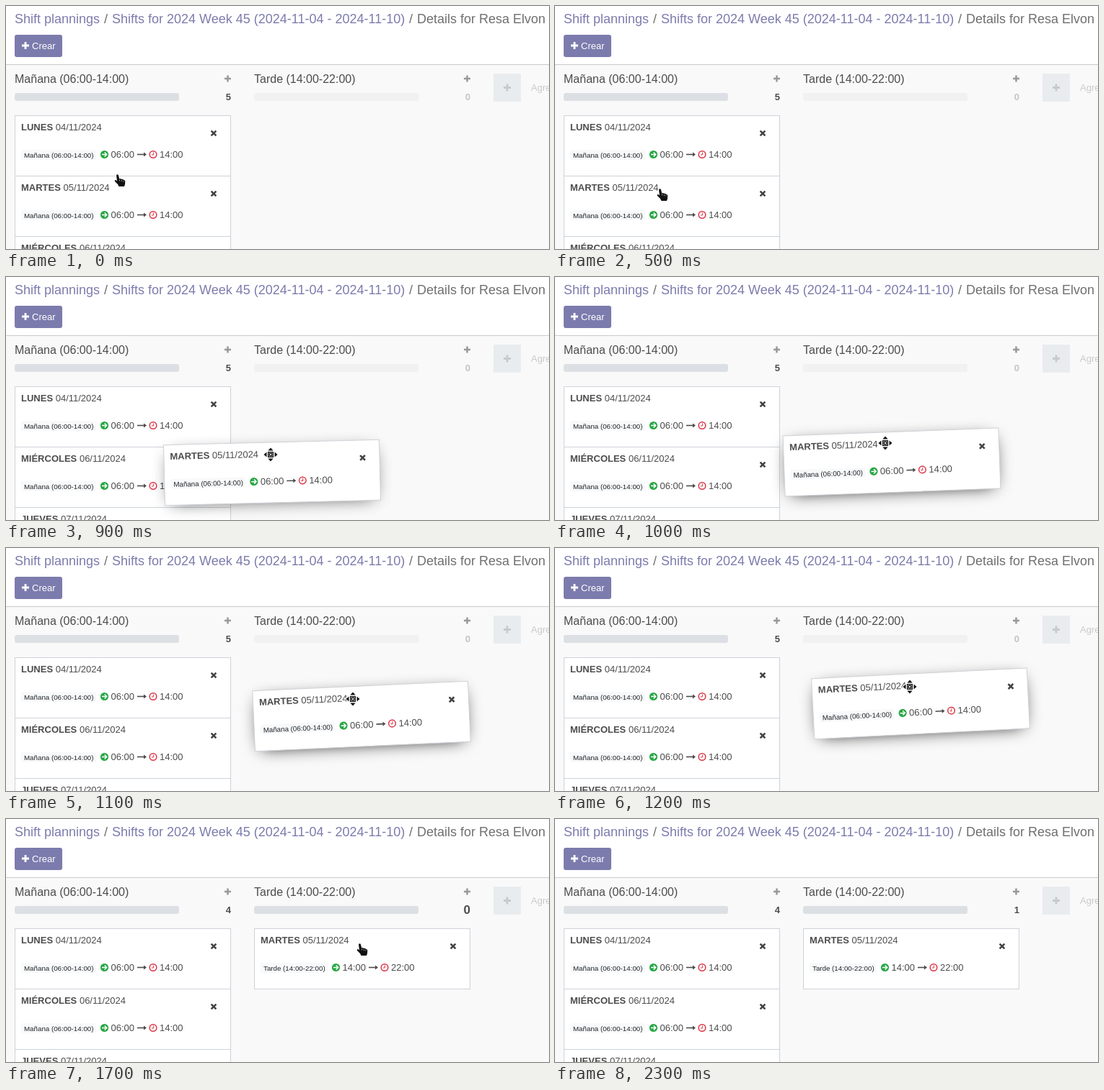
Write an HTML page that moves like this. It is 753 px wide and 338 px high and loops after 2.5 s.

```html
<!DOCTYPE html>
<html lang="es">
<head>
<meta charset="utf-8">
<title>Shift plannings</title>
<style>
html, body { margin: 0; width: 100%; height: 100%; overflow: hidden; background: #fff; }
svg { display: block; font: 13px "Liberation Sans", Arial, sans-serif; fill: #4c4c4c; }
text { white-space: pre; }
.bold { font-weight: bold; }
.nav { font-size: 18px; fill: #6f6f6f; }
.link { fill: #7c7bad; }
.head { font-size: 16px; }
.tag { font-size: 9.75px; fill: #212529; }
.shadow { filter: blur(12.5px); }
.cursor { fill: #111; stroke: #fff; stroke-width: 2; paint-order: stroke; stroke-linejoin: round; }
</style>
</head>
<body>
<svg id="stage" width="753" height="338" viewBox="0 0 753 338"></svg>
<script>
const LOOP = 2500, STEP = 100;
const stage = document.getElementById('stage');
const MORNING = { tag: 'Mañana (06:00-14:00)', from: '06:00', to: '14:00', shift: 0 };
const EVENING = { tag: 'Tarde (14:00-22:00)', from: '14:00', to: '22:00', shift: -11 };

// time, shape, x, y
const cursorTrack = [
  [0, 'hand', 154, 234], [300, 'hand', 151, 241], [400, 'hand', 147, 250], [500, 'hand', 145, 254],
  [800, 'move', 227, 259], [900, 'move', 367, 247], [1000, 'move', 458, 231],
  [1100, 'move', 481, 210], [1200, 'move', 492, 193], [1300, 'move', 491, 191],
  [1400, 'hand', 491, 190], [1500, 'hand', 491, 187], [1600, 'hand', 490, 181], [1700, 'hand', 490, 173],
  [1800, 'arrow', 443, 120], [1900, 'arrow', 389, 66], [2000, '', 0, 0]
];
// time, centre x, centre y, angle, shadow opacity
const dragTrack = [
  [800, 216, 281, -.55, .35], [900, 369, 272, -1.4, .75], [1000, 467, 257.5, -2.1, 1],
  [1100, 493, 234, -2.6, 1], [1200, 507, 216.3, -2.85, 1], [1300, 507, 215, -2.97, 1]
];
const at = (track, t) => track.findLast(k => k[0] <= t);

const cursors = {
  hand: `<path d="M-1 1.5Q.5-1 2 1.5L3.2 6.4Q5 5.4 6 7Q8 6 9 8Q11 7.5 11.3 10L11 14L10 17H2.5L1 14L-3 10Q-3.8 7.5-1.5 8.2L0 9.5Z"/>
    <path d="M3.6 7.5v2M6.4 8.2v2M9 9v1.5" stroke-width=".6"/>`,
  move: [0, 90, 180, 270].map(a => `<path transform="rotate(${a})" d="M0-9.5L3.6-5.5H-3.6Z"/>`).join('') +
    '<path d="M-4-4H4V4H-4Z"/><path d="M-2.5-2.5h5v5h-5Z" stroke-width="1"/><path d="M-1-1H1V1H-1Z" stroke="none" fill="#fff"/>',
  arrow: '<path d="M0 0V14L3.3 11L5.6 16.5L8 15.5L5.7 10.2H10Z"/>'
};

const text = (x, y, s, cls = '', extra = '') => `<text x="${x}" y="${y}" class="${cls}" ${extra}>${s}</text>`;
const rect = (x, y, w, h, fill, extra = '') => `<rect x="${x}" y="${y}" width="${w}" height="${h}" fill="${fill}" ${extra}/>`;
const group = (x, y, body, extra = '') => `<g transform="translate(${x} ${y}) ${extra}">${body}</g>`;
const plus = (x, y, size, color) =>
  `<path d="M${x - size / 2} ${y}h${size}M${x} ${y - size / 2}v${size}" stroke="${color}" stroke-width="${size * .28}"/>`;

function card(day, date, shift = MORNING, shadow = 0) {
  const times =
    `<circle cx="124.5" cy="54.5" r="5.6" fill="#28a745"/>
    <path d="M121 54.5H127.5M124.7 51.5L127.7 54.5L124.7 57.5" fill="none" stroke="#fff" stroke-width="1.5"/>` +
    text(133.5, 59, shift.from) +
    `<path d="M170 54.5H180" stroke="#4c4c4c" stroke-width="1.6"/><path d="M179 51.5L183 54.5L179 57.5Z"/>
    <circle cx="192" cy="54.5" r="4.8" fill="none" stroke="#dc3545" stroke-width="1.5"/>
    <path d="M192.4 51.5V55H189.8" fill="none" stroke="#dc3545"/>` +
    text(201, 59, shift.to);
  return (shadow ? rect(10, 15, 280, 65, '#000', `class="shadow" opacity="${shadow}"`) : '') +
    rect(.5, .5, 299, 84, '#fff', 'stroke="#ced2d8"') +
    text(9, 21, `<tspan class="bold">${day}</tspan> ${date}/11/2024`) +
    '<path d="M272.6 21.6L279.4 28.4M279.4 21.6L272.6 28.4" stroke="#444" stroke-width="2.6"/>' +
    rect(9, 48, 104 + shift.shift, 14, '#f8f9fa', 'rx="2"') +
    text(13, 59, shift.tag, 'tag') + group(shift.shift, 0, times);
}

function column(x, title, count, size, active) {
  return text(x, 107, title, 'head') + plus(x + 295.5, 101, 9, '#999') +
    rect(x, 121, 228, 11, active ? '#dce0e4' : '#f1f1f1', 'rx="3"') +
    text(x + 300, 131 + (size - 13) / 4, count, 'bold',
      `text-anchor="end" font-size="${size}" fill="${active ? '#4c4c4c' : '#c4c4c4'}"`);
}

const backdrop =
  rect(0, 0, 753, 82, '#fff') + rect(0, 82, 753, 256, '#f9f9f9') + rect(0, 81, 753, 1, '#cacaca') +
  text(12, 24, 'Shift plannings', 'nav link') + text(136, 24, '/', 'nav') +
  text(147, 24, 'Shifts for 2024 Week 45 (2024-11-04 - 2024-11-10)', 'nav link') +
  text(559, 24, '/', 'nav') + text(570, 24, 'Details for Resa Elvon', 'nav') +
  rect(12, 40, 66, 31, '#7c7bad', 'rx="3"') + plus(27, 55, 10, '#fff') + text(36, 60, 'Crear', '', 'fill="#fff"') +
  rect(676, 94, 38, 39, '#e9ecef') + plus(695, 113.5, 10, '#c6cacd') +
  text(728, 118, 'Agregar columna', '', 'fill="#c8cacc"');

function counterSize(t) {
  if (t < 1700) return 13;
  return t < 2000 ? 17 : Math.max(13, 17 - (t - 1900) / 100);
}

function draw(t) {
  const held = t >= 800 && t < 1400, saved = t >= 1600;
  const tuesday = ['MARTES', '05'];
  const rest = [['MIÉRCOLES', '06'], ['JUEVES', '07']];
  const list = [['LUNES', '04'], ...(t < 800 ? [tuesday] : []), ...rest];
  const gap = t === 800 ? 90 : 0;

  let out = backdrop +
    column(12, MORNING.tag, saved ? 4 : 5, 13, true) +
    column(344, EVENING.tag, t < 2000 ? 0 : 1, counterSize(t), saved);
  list.forEach((c, i) => out += group(12, 152 + 84 * i + (i ? gap : 0), card(...c)));

  if (held) {
    const [, x, y, angle, shadow] = at(dragTrack, t);
    out += group(x, y, card(...tuesday, MORNING, shadow), `rotate(${angle}) translate(-150 -42.5)`);
  } else if (t >= 1400) {
    out += group(344, 152, card(...tuesday, saved ? EVENING : MORNING));
  }

  const [, shape, x, y] = at(cursorTrack, t);
  if (shape) out += `<g class="cursor">${group(x, y, cursors[shape])}</g>`;
  stage.innerHTML = out;
}

let shown = -1;
function tick() {
  const t = Math.floor(performance.now() % LOOP / STEP) * STEP;
  if (t !== shown) draw(shown = t);
  requestAnimationFrame(tick);
}
tick();
</script>
</body>
</html>
```
